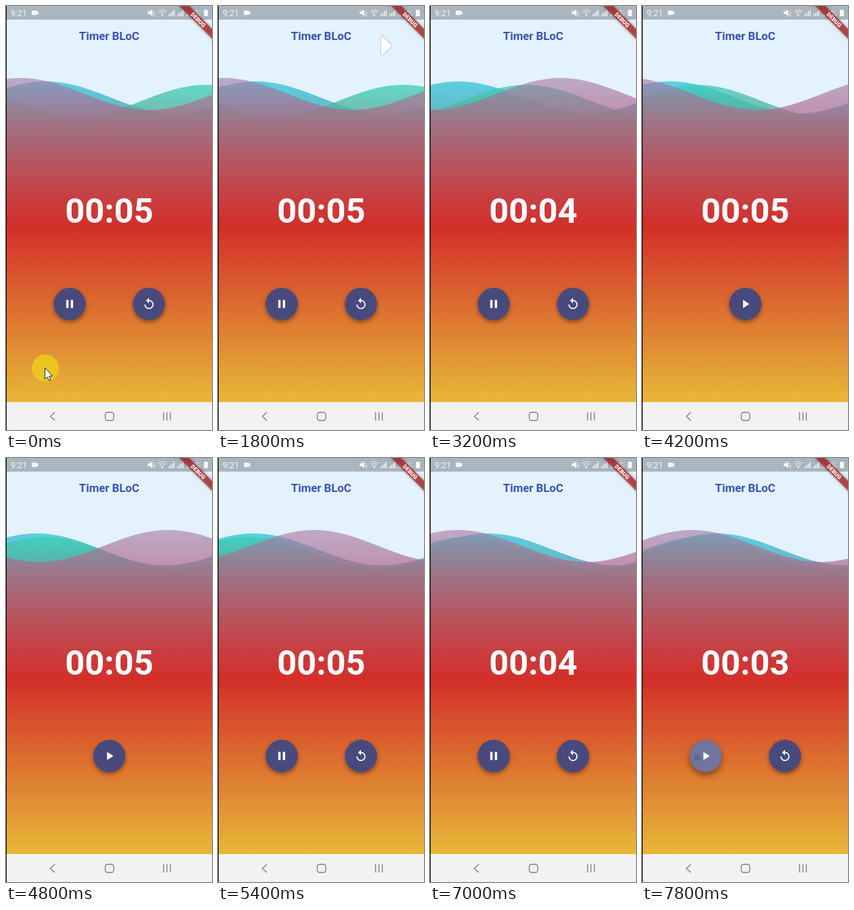
Animation of 304x624 px, one loop 8 s. Source, as an HTML page with a canvas:

```html
<!DOCTYPE html>
<html>
<head>
<meta charset="utf-8">
<style>
html, body { margin: 0; width: 100%; height: 100%; overflow: hidden; }
canvas { display: block; width: 304px; height: 624px; }
</style>
</head>
<body>
<canvas id="stage" width="304" height="624"></canvas>
<script>
const ctx = document.getElementById('stage').getContext('2d');
const LOOP = 8000, STEP = 200, WAVES_START = 1800;
const WAVE_LENGTH = 380, AMPLITUDE = 23.5;
const ICONS = {
  pause: new Path2D('M6 19h4V5H6v14zm8-14v14h4V5h-4z'),
  play: new Path2D('M8 5v14l11-7z'),
  replay: new Path2D('M12 5V1L7 6l5 5V7c3.31 0 6 2.69 6 6s-2.69 6-6 6-6-2.69-6-6H4c0 4.42 3.58 8 8 8s8-3.58 8-8-3.58-8-8-8z'),
  camera: new Path2D('M17 10.5V7c0-.55-.45-1-1-1H4c-.55 0-1 .45-1 1v10c0 .55.45 1 1 1h12c.55 0 1-.45 1-1v-3.5l4 4v-11l-4 4z')
};

// turn: step at which the wave reverses; duration: steps for one sweep
const WAVES = [
  { color: 'rgba(0,188,212,.6)', center: 134.5, turn: 9.6, duration: 97 },
  { color: 'rgba(50,215,190,.75)', center: 139.5, turn: 20.7, duration: 54 },
  { color: 'rgba(165,120,165,.6)', center: 129.5, turn: 25.6, duration: 30 }
];

// cubic-bezier(.42, 0, .58, 1)
function easeInOut(x) {
  let lo = 0, hi = 1, s;
  for (let i = 0; i < 24; i++) {
    s = (lo + hi) / 2;
    const bx = 1.26 * (1 - s) ** 2 * s + 1.74 * (1 - s) * s * s + s ** 3;
    if (bx < x) lo = s; else hi = s;
  }
  return s * s * (3 - 2 * s);
}

function rect(x, y, w, h, color) {
  ctx.fillStyle = color;
  ctx.fillRect(x, y, w, h);
}

function circle(x, y, r, color) {
  ctx.fillStyle = color;
  ctx.beginPath();
  ctx.arc(x, y, r, 0, 2 * Math.PI);
  ctx.fill();
}

function polygon(points, color) {
  ctx.beginPath();
  points.forEach(([x, y]) => ctx.lineTo(x, y));
  ctx.closePath();
  ctx.fillStyle = color;
  ctx.fill();
}

function text(string, x, y, font, color, align = 'center') {
  ctx.font = font + ' Roboto, sans-serif';
  ctx.textAlign = align;
  ctx.fillStyle = color;
  ctx.fillText(string, x, y);
}

function icon(name, x, y, scale, color = '#fff') {
  ctx.save();
  ctx.translate(x, y);
  ctx.scale(scale, scale);
  ctx.translate(-12, -12);
  ctx.fillStyle = color;
  ctx.fill(ICONS[name]);
  ctx.restore();
}

function withShadow(blur, dy, alpha, draw) {
  ctx.save();
  ctx.shadowColor = `rgba(0,0,0,${alpha})`;
  ctx.shadowBlur = blur;
  ctx.shadowOffsetY = dy;
  draw();
  ctx.restore();
}

function drawWave(wave, step) {
  const peak = 41 + 2 * WAVE_LENGTH * easeInOut(Math.abs(step - wave.turn) / wave.duration);
  const fill = ctx.createLinearGradient(0, 106, 0, 583);
  fill.addColorStop(0, wave.color);
  fill.addColorStop(.46, 'rgb(211,47,41)');
  fill.addColorStop(1, 'rgb(231,184,56)');
  ctx.beginPath();
  ctx.moveTo(0, 583);
  for (let x = 0; x <= 304; x++) {
    ctx.lineTo(x, wave.center - AMPLITUDE * Math.cos(2 * Math.PI * (x - peak) / WAVE_LENGTH));
  }
  ctx.lineTo(304, 583);
  ctx.fillStyle = fill;
  ctx.fill();
}

function drawButton(x, name, pressed) {
  withShadow(pressed ? 10 : 6, pressed ? 5 : 3, .4, () => circle(x, 438.5, 23.7, '#484a7e'));
  if (pressed) {
    circle(x, 438.5, 23.7, 'rgba(255,255,255,.23)');
    circle(82, 441, 5, 'rgba(72,74,126,.35)');
  }
  icon(name, x, 438.5, .846);
}

function drawStatusBar() {
  const white = '#f4f6f7';
  rect(0, 0, 304, 20, '#aab5bd');
  text('9:21', 7, 15, '12.5px', white, 'left');
  icon('camera', 43, 10, .55, white);

  // muted speaker
  polygon([[209, 8], [212, 8], [216, 5], [216, 15], [212, 12], [209, 12]], white);
  ctx.strokeStyle = white;
  ctx.lineWidth = 1;
  ctx.beginPath();
  ctx.moveTo(210, 5);
  ctx.lineTo(220, 15);
  ctx.moveTo(218, 7);
  ctx.lineTo(220, 12);
  ctx.stroke();

  // wifi
  for (const r of [3, 6, 9]) {
    ctx.beginPath();
    ctx.arc(230.5, 14.5, r, -Math.PI * .76, -Math.PI * .24);
    ctx.stroke();
  }
  circle(230.5, 14, 1.2, white);

  // signal strength
  for (const x of [240, 253]) {
    for (let i = 0; i < 4; i++) rect(x + i * 2.5, 12 - i * 2, 1.4, 3 + i * 2, white);
  }
  text('39%', 265, 15, '12px', white, 'left');
  rect(292, 6, 6, 9, white);
  rect(293.5, 5, 3, 1, white);
}

function drawBanner() {
  ctx.save();
  ctx.translate(304, 0);
  ctx.rotate(Math.PI / 4);
  withShadow(5, 0, .5, () => rect(-50, 23.7, 100, 10.2, 'rgba(183,28,28,.7)'));
  text('DEBUG', 0, 31.8, '900 8.4px', '#fff');
  ctx.restore();
}

function drawNavBar() {
  rect(0, 583, 304, 41, '#f2f2f2');
  ctx.strokeStyle = '#808080';
  ctx.lineWidth = 1.4;
  ctx.beginPath();
  ctx.moveTo(72, 598);
  ctx.lineTo(65.5, 604);
  ctx.lineTo(72, 610);
  ctx.roundRect(146.5, 598, 12.5, 12, 3.5);
  for (const x of [232.5, 237.5, 242.5]) {
    ctx.moveTo(x, 598);
    ctx.lineTo(x, 610);
  }
  ctx.stroke();
}

function drawPointer(t) {
  if (t < 1000) {
    circle(58, 533, 20, '#ecc41f');
    const arrow = [[57.5, 532.5], [57.5, 549], [61, 545.8], [63.6, 551.5], [66, 550.3], [63.5, 545], [68.5, 544.5]];
    polygon(arrow, '#fff');
    ctx.strokeStyle = '#222';
    ctx.lineWidth = 1;
    ctx.stroke();
  } else if (t >= 1800 && t < 3000) {
    withShadow(2, 0, .5, () => polygon([[241, 43], [257, 58.5], [241, 74]], '#fff'));
  }
}

function secondsLeft(t) {
  if (t < 2600) return 5;
  if (t < 3600) return 4;
  if (t < 4000) return 3;
  if (t < 6200) return 5;
  return t < 7200 ? 4 : 3;
}

function draw(t) {
  const step = Math.max(-1, Math.floor((t - WAVES_START) / STEP));
  rect(0, 0, 304, 624, '#e3f2fd');
  WAVES.forEach(wave => drawWave(wave, step));
  text('Timer BLoC', 152.3, 50, 'bold 16.8px', '#3f51b5');
  text('00:0' + secondsLeft(t), 152.3, 319, 'bold 50.5px', '#fff');

  if (t >= 4000 && t < 5200) {
    drawButton(152.5, 'play');
  } else {
    drawButton(94, t >= 7800 ? 'play' : 'pause', t >= 7600);
    drawButton(211, 'replay');
  }
  drawStatusBar();
  drawBanner();
  drawNavBar();
  drawPointer(t);
  rect(0, 0, 1, 624, '#000');
}

const start = performance.now();
function tick() {
  draw((performance.now() - start) % LOOP);
  requestAnimationFrame(tick);
}
tick();
</script>
</body>
</html>
```
